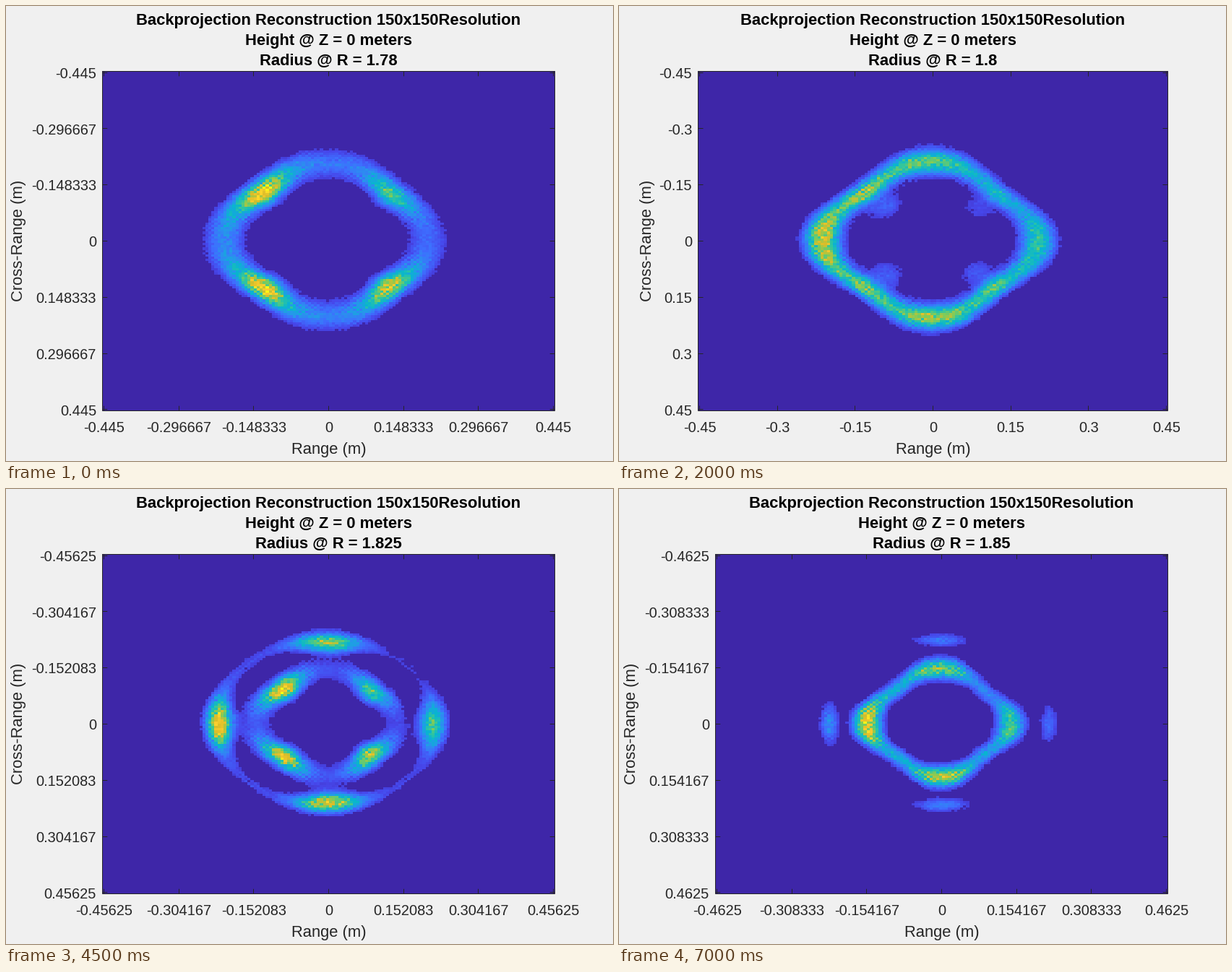
Write a matplotlib script that moves like this. It is 840 px wide and 630 px high and loops after 7500 ms.

```python
import numpy as np
import matplotlib.pyplot as plt
from matplotlib.animation import FuncAnimation
from matplotlib.colors import LinearSegmentedColormap

W, H, DPI = 840, 630, 100
FRAMES, INTERVAL = 15, 500
N = 150
TOP, RIGHT, BOTTOM = 90.5, 759.5, 560.5
INK = "#262626"
PT = 72 / DPI

plt.rcParams["font.family"] = "Liberation Sans"

CMAP = LinearSegmentedColormap.from_list("scale", [
    "#3e26a8", "#4747eb", "#3e6fff", "#2797eb", "#08b5d0",
    "#31c69f", "#81cc59", "#dcbd29", "#fccf30", "#f9fb15"])

cells = np.arange(N) - (N - 1) / 2
X, Y = np.meshgrid(cells, cells)
RAD, ANG = np.hypot(X, Y), np.arctan2(Y, X)

# CARD is 1 towards the four sides and 0 towards the corners
CARD = (1 + np.cos(4 * ANG)) / 2
CHECKER = np.cos(.94 * np.pi * X) * np.cos(.94 * np.pi * Y)

# Brighter on the left and bottom, dimmer between the eight lobes
GAIN = (.78 - .14 * np.cos(ANG) + .05 * np.sin(ANG) + .06 * np.sin(2 * ANG))
GAIN = GAIN * (1 - .35 * np.sin(4 * ANG) ** 2)
SHIFT = -np.cos(ANG) - .5 * np.sin(ANG)


def smoothstep(x):
    x = np.clip(x, 0, 1)
    return x * x * (3 - 2 * x)


def ring(k, i):
    """Ring k lights up at its corners first, then at its sides."""
    start = 1 + 9 * k
    age = i - start - 6 * CARD ** 1.4
    life = (4 + .6 * CARD) * .82 ** k
    strength = GAIN * np.exp(-(age / life) ** 2 / 2)

    radius = 29.5 + (5.5 + .2 * age) * CARD
    radius = radius + 8 * smoothstep((i - start - 4) / 5) * (1 - CARD)
    radius = radius * .69 ** k + SHIFT
    width = np.clip(3.3 - .17 * age, 1.6, 5) * .85 ** k
    return strength * np.exp(-((RAD - radius) / width) ** 2 / 2)


def reflectivity(i):
    rng = np.random.default_rng(100 + i)
    grain = np.clip(rng.normal(size=(N, N)), -2, 2)
    field = ring(0, i) + ring(1, i)
    field = field * (1.04 + .15 * CHECKER + .11 * grain)
    return np.where(field < .085, 0, np.clip(field, 0, 1))


fig = plt.figure(figsize=(W / DPI, H / DPI), dpi=DPI, facecolor="#f0f0f0")
ax = fig.add_axes([0, 0, 1, 1])


def put(x, y, s, px, color=INK, ha="center", **kw):
    ax.text(x, y, s, fontsize=px * PT, color=color, ha=ha,
            va="baseline", **kw)


def line(xs, ys):
    ax.plot(xs, ys, color=INK, lw=PT, snap=False,
            solid_capstyle="projecting", solid_joinstyle="miter")


def draw(i):
    ax.cla()
    ax.axis("off")
    radius = 1.78 + .005 * i
    labels = [f"{radius / 4 * k / 3:g}" for k in range(-3, 4)]
    longest = max(map(len, labels))

    # The plot box makes room for the longest tick label
    left = 109.5 + 12 * max(0, longest - 7)
    label_x = 23 + 11 * max(0, 7 - longest)
    mid = (left + RIGHT) / 2

    ax.imshow(reflectivity(i), cmap=CMAP, vmin=0, vmax=1, aspect="auto",
              interpolation="nearest", extent=(left, RIGHT, BOTTOM, TOP))

    half_x, half_y = (RIGHT - left) / N / 2, (BOTTOM - TOP) / N / 2
    tick = .01 * (RIGHT - left)
    xs = np.linspace(left + half_x, RIGHT - half_x, 7)
    ys = np.linspace(TOP + half_y, BOTTOM - half_y, 7)
    for x, y, s in zip(xs, ys, labels):
        px, py = np.floor(x) + .5, np.floor(y) + .5
        line([px, px], [TOP, TOP + tick])
        line([px, px], [BOTTOM, BOTTOM - tick])
        line([left, left + tick], [py, py])
        line([RIGHT, RIGHT - tick], [py, py])
        put(x, 590, s, 20)
        put(left - 8.5, y + 7.7, s, 20, ha="right")
    line([left, RIGHT, RIGHT, left, left], [TOP, TOP, BOTTOM, BOTTOM, TOP])

    title = ("Backprojection Reconstruction 150x150Resolution",
             "Height @ Z = 0 meters", f"Radius @ R = {radius:g}")
    for k, s in enumerate(title):
        put(mid, 26 + 28 * k, s, 22, "black", weight="bold")
    put(mid, 620, "Range (m)", 22)
    put(label_x, 325, "Cross-Range (m)", 22, rotation=90,
        rotation_mode="anchor")

    ax.set_xlim(0, W)
    ax.set_ylim(H, 0)
    return []


anim = FuncAnimation(fig, draw, frames=FRAMES, interval=INTERVAL,
                     init_func=lambda: [], repeat=True, repeat_delay=0)
plt.show()
```
